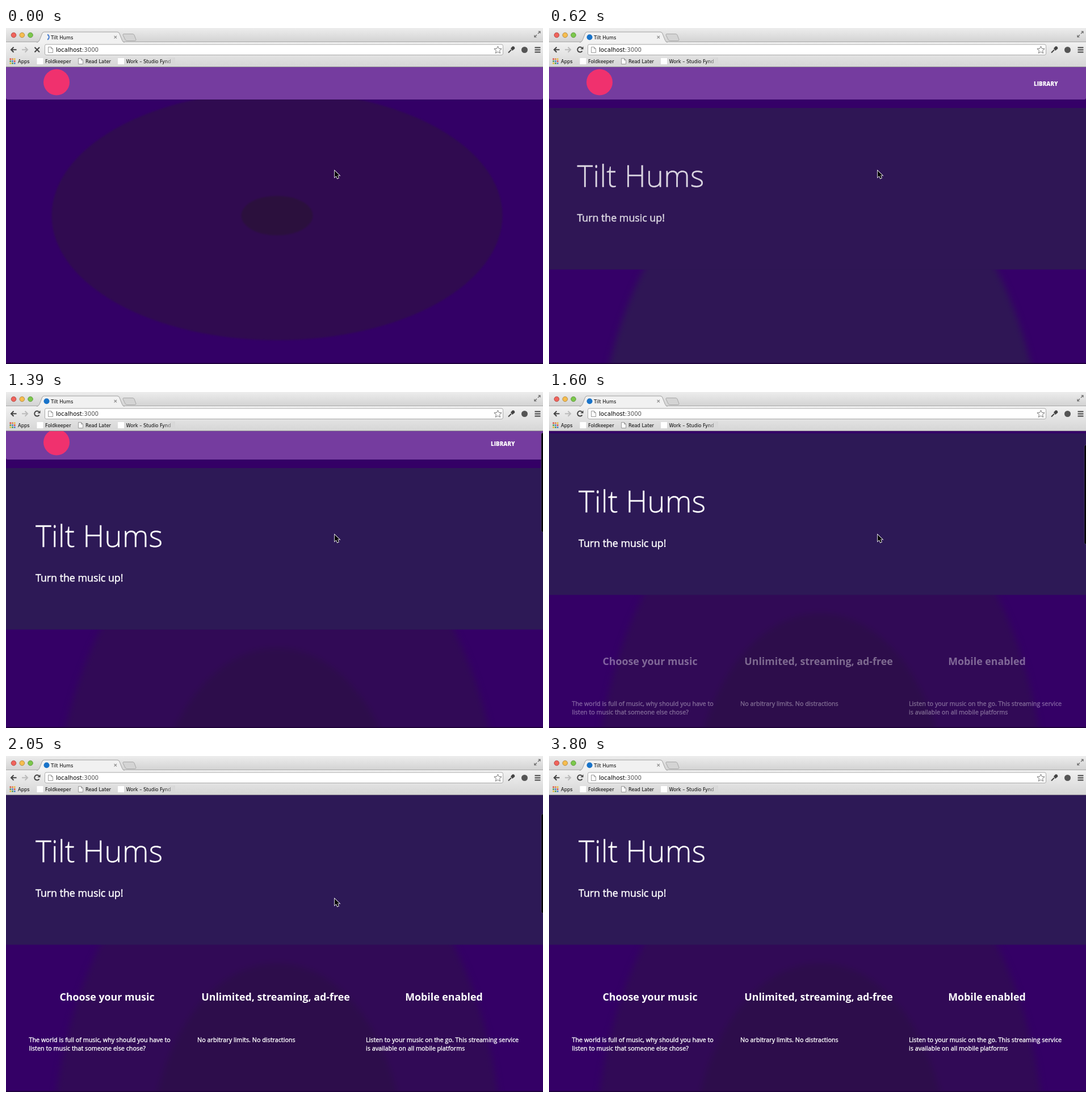
Write an HTML page that moves like this. It is 946 px wide and 592 px high and loops after 3910 ms.

```html
<!DOCTYPE html>
<html lang="en">
<head>
<meta charset="utf-8">
<title>Tilt Hums</title>
<style>
  html, body { margin: 0; width: 100%; height: 100%; overflow: hidden; background: #330066; }
  svg { display: block; width: 946px; height: 592px; }
  .page text { font-family: "Open Sans", sans-serif; fill: #fff; }
  .page .title { font-size: 53px; font-weight: 300; stroke: #fff; stroke-width: .3px; }
  .page .sub { font-size: 17.8px; stroke: #fff; stroke-width: .5px; }
  .page .nav { font-size: 9.8px; font-weight: 800; }
  .page .head { font-size: 17.8px; font-weight: 700; text-anchor: middle; }
  .page .body { font-size: 10.8px; stroke: #fff; stroke-width: .35px; }
  .chrome text { font: 8.3px "DejaVu Sans", sans-serif; fill: #000; }
  .chrome .url { font-size: 10.2px; }
  .line { fill: none; stroke: #444; stroke-width: 2; }
</style>
</head>
<body>
<svg viewBox="0 0 946 592">
  <defs>
    <linearGradient id="bar" x2="0" y2="1">
      <stop stop-color="#ededed"/><stop offset="1" stop-color="#d2d2d2"/>
    </linearGradient>
    <linearGradient id="tool" x2="0" y2="1">
      <stop stop-color="#f1f1f1"/><stop offset="1" stop-color="#d6d6d6"/>
    </linearGradient>
    <linearGradient id="fade">
      <stop stop-color="#d8d8d8" stop-opacity="0"/><stop offset="1" stop-color="#d8d8d8"/>
    </linearGradient>
    <filter id="soft" color-interpolation-filters="sRGB"><feGaussianBlur id="blur"/></filter>
  </defs>

  <rect id="back" width="946" height="592"/>
  <g class="page" id="page">
    <g filter="url(#soft)">
      <ellipse id="ring" cx="477.5" rx="397"/>
      <ellipse id="core" cx="477.5"/>
    </g>
    <path d="M0 60H946V123q0 3-3 3H3q-3 0-3-3Z" fill="#753c9f"/>
    <circle cx="89" cy="95.500" r="23" fill="#f0316e"/>
    <g id="content">
      <text class="nav" x="854" y="101.500">LIBRARY</text>
      <rect id="hero" y="141" width="946" height="284.500"/>
      <g id="intro">
        <text class="title" x="52" y="279.500">Tilt Hums</text>
        <text class="sub" x="52" y="341">Turn the music up!</text>
      </g>
      <g id="features">
        <text class="head" x="178" y="524">Choose your music</text>
        <text class="head" x="475" y="524">Unlimited, streaming, ad-free</text>
        <text class="head" x="771.500" y="524">Mobile enabled</text>
        <text class="body" x="40.500" y="596.500">The world is full of music, why should you have to</text>
        <text class="body" x="40.500" y="611.500">listen to music that someone else chose?</text>
        <text class="body" x="337" y="596.500">No arbitrary limits. No distractions</text>
        <text class="body" x="634" y="596.500">Listen to your music on the go. This streaming service</text>
        <text class="body" x="634" y="611.500">is available on all mobile platforms</text>
      </g>
    </g>
  </g>
  <rect y="590" width="946" height="2" fill="#1c0038" opacity=".8"/>
  <rect id="scrollbar" x="943" width="8" height="175" rx="3" fill="#050209" stroke="#4a3f60" stroke-width=".8"/>

  <g class="chrome">
    <rect width="946" height="25" fill="url(#bar)"/>
    <rect y="25" width="946" height="43" fill="url(#tool)"/>
    <path d="M0 24.500H946" stroke="#a8a8a8"/>
    <path d="M0 68.500H946" stroke="#8f8a94"/>
    <g stroke-width=".8">
      <circle cx="13.500" cy="12.500" r="4.300" fill="#f0645c" stroke="#a63c37"/>
      <circle cx="28.300" cy="12.500" r="4.300" fill="#f6bd4f" stroke="#a87b2a"/>
      <circle cx="43" cy="12.500" r="4.300" fill="#7cc84c" stroke="#4c8a2c"/>
    </g>
    <path d="M54 25.500q4-1 5-4L63.500 10q1-3 4-3H196q3 0 4 3l4.500 11.500q1 3 4 4" fill="#f1f1f1" stroke="#a0a0a0"/>
    <path d="M207 10.500H223q2 0 3 2l3 8q0 2-2 2H213q-2 0-3-2l-4-8q0-2 1-2Z" fill="#d4d4d4" stroke="#a8a8a8"/>
    <path id="spinner" d="M73 11.500a5 5 0 0 1 0 9" class="line" style="stroke:#4a7fd0"/>
    <circle id="favicon" cx="71.500" cy="16.300" r="5" fill="#1873c9"/>
    <text x="79" y="19.500">Tilt Hums</text>
    <path d="M190.500 13.800l4.500 4.500m0-4.500l-4.500 4.500" class="line" style="stroke:#888;stroke-width:1.200"/>
    <path d="M937 10l4-4m-3.500 0H941V9.500M935 12l-4 4m0-3.500V16H934.500" class="line" style="stroke:#666;stroke-width:1.200"/>

    <path d="M18.500 38.300H9m4.500-4.500L9 38.300l4.500 4.500" class="line"/>
    <path d="M28 38.300H38m-4.500-4.500L38 38.300l-4.500 4.500" class="line" style="stroke:#bbb"/>
    <path id="stop" d="M50.500 34l8.500 8.500m0-8.500l-8.500 8.500" class="line"/>
    <g id="reload">
      <path d="M58.500 40.500a4.500 4.500 0 1 1-.5-5.500" class="line"/>
      <path d="M60.500 32.500V37.500H55.500Z" fill="#444"/>
    </g>
    <rect x="68.500" y="29" width="807" height="18.500" rx="2.500" fill="#fff" stroke="#a9a9a9"/>
    <path d="M74.500 33.500H79.500l3 3V43.500H74.500ZM79.500 33.500v3h3" fill="#fff" stroke="#999"/>
    <text class="url" x="88" y="42">localhost<tspan fill="#555">:3000</tspan></text>
    <path d="M866.500 32l1.900 4.300 4.700.4-3.600 3.100 1.100 4.600-4.100-2.400-4.100 2.400 1.100-4.600-3.600-3.100 4.700-.4Z" fill="#fff" stroke="#777"/>
    <path d="M885 43.500l5-5" class="line"/>
    <path d="M889 36l3-3.500q3-1 4 1.500t-1 3.500l-3 2.500Z" fill="#444"/>
    <circle cx="913.500" cy="38.500" r="5.500" fill="#555"/>
    <path d="M931.500 34.500h10m-10 4h10m-10 4h10" class="line"/>

    <g id="apps"></g>
    <text x="21" y="61.500">Apps</text>
    <rect x="54.500" y="53" width="11" height="11" fill="#fff"/>
    <text x="69" y="61.500">Foldkeeper</text>
    <path d="M127.500 53.500H132.500l3 3V63.500H127.500ZM132.500 53.500v3h3" fill="#fff" stroke="#999"/>
    <text x="140" y="61.500">Read Later</text>
    <rect x="197" y="53" width="11" height="11" fill="#fff"/>
    <text x="211.500" y="61.500">Work – Studio Fynd</text>
    <rect x="278" y="52" width="20" height="14" fill="url(#fade)"/>
  </g>

  <path id="cursor" d="M0 0V11.500L2.700 9l2 4.600 2.200-1L5 8.200H8.500Z" fill="#000" stroke="#fff" stroke-width="1.600" paint-order="stroke"/>
</svg>
<script>
const $ = id => document.getElementById(id);
const set = (id, attrs) => Object.entries(attrs).forEach(([k, v]) => $(id).setAttribute(k, v));
const show = (id, on) => set(id, { opacity: +on });

const LOOP = 3910;
const run = (start, step, count) => Array.from({ length: count }, (_, i) => start + i * step);
const ticks = [0, 80, 230, ...run(380, 170 / 3, 10), 950, 1010, 1130,
  1390, 1450, 1600, 1750, 1900, 2050, ...run(2850, 35, 5), 3650, 3800];
const scrollStops = [[0, 0], [1390, 7], [1450, 25], [1600, 68], [1750, 80], [1900, 93]];
const cursorStops = [[0, 579, 251.5], [2850, 640, 250], [2885, 735, 244], [2920, 830, 250], [2955, 912, 257]];
const at = (stops, t) => stops.filter(s => s[0] <= t + .01).pop();

// CSS "ease": cubic-bezier(.25, .1, .25, 1)
function ease(x) {
  if (x <= 0) return 0;
  if (x >= 1) return 1;
  const bezier = (a, b, s) => 3 * a * s * (1 - s) ** 2 + 3 * b * s * s * (1 - s) + s ** 3;
  let lo = 0, hi = 1;
  for (let i = 0; i < 24; i++) {
    const mid = (lo + hi) / 2;
    if (bezier(.25, .25, mid) < x) lo = mid; else hi = mid;
  }
  return bezier(.1, 1, lo);
}

$('apps').innerHTML = ['#d9483b', '#e07b39', '#e8b72f', '#4a9a4a', '#3f78c9', '#d9483b', '#e8b72f', '#4a9a4a', '#3f78c9']
  .map((c, i) => `<rect x="${6.5 + i % 3 * 3.7}" y="${53.5 + Math.floor(i / 3) * 3.7}" width="2.6" height="2.6" fill="${c}"/>`).join('');

function draw(t) {
  const loaded = t >= 80, scrolled = t >= 1390;
  const scroll = at(scrollStops, t)[1];
  set('page', { transform: `translate(0 ${-scroll})` });

  // The backdrop ellipses keep the proportions of the whole page
  const height = loaded ? 1490 : 523, cy = 69 + height / 2;
  const [outer, ring, core, hero] = !loaded ? ['#330066', '#300b50', '#2b103d', '#2f1655']
    : scrolled ? ['#340066', '#310a56', '#2d0d4b', '#2d1956']
    : ['#350068', '#2f1655', '#2f1655', '#2f1655'];
  const coreRx = loaded ? 226 : 63;
  set('back', { fill: outer });
  set('ring', { cy, ry: 397 * height / 946, fill: ring });
  set('core', { cy, rx: coreRx, ry: coreRx * height / 946, fill: core });
  set('blur', { stdDeviation: loaded ? 6 : 1.5 });
  set('hero', { fill: hero });
  show('content', loaded);

  const intro = ease((t - 80) / 1000), rise = ease((t - 1480) / 500);
  set('intro', { opacity: intro, transform: `translate(${-15 * (1 - intro)} 0)` });
  set('features', { opacity: rise, transform: `translate(0 ${40 * (1 - rise)})` });

  show('spinner', t < 230);
  set('spinner', { transform: `rotate(${loaded ? 120 : 0} 71.5 16)` });
  show('favicon', t >= 230);
  show('stop', t < 230);
  show('reload', t >= 230);

  set('scrollbar', { y: 69.5 + scroll * .35, opacity: !scrolled || t >= 3800 ? 0 : t >= 3650 ? .5 : 1 });
  const [, x, y] = at(cursorStops, t);
  set('cursor', { transform: `translate(${x} ${y})`, opacity: t < 2990 ? 1 : 0 });
}

function frame() {
  const t = performance.now() % LOOP;
  draw(ticks.filter(k => k <= t).pop());
  requestAnimationFrame(frame);
}
frame();
</script>
</body>
</html>
```
